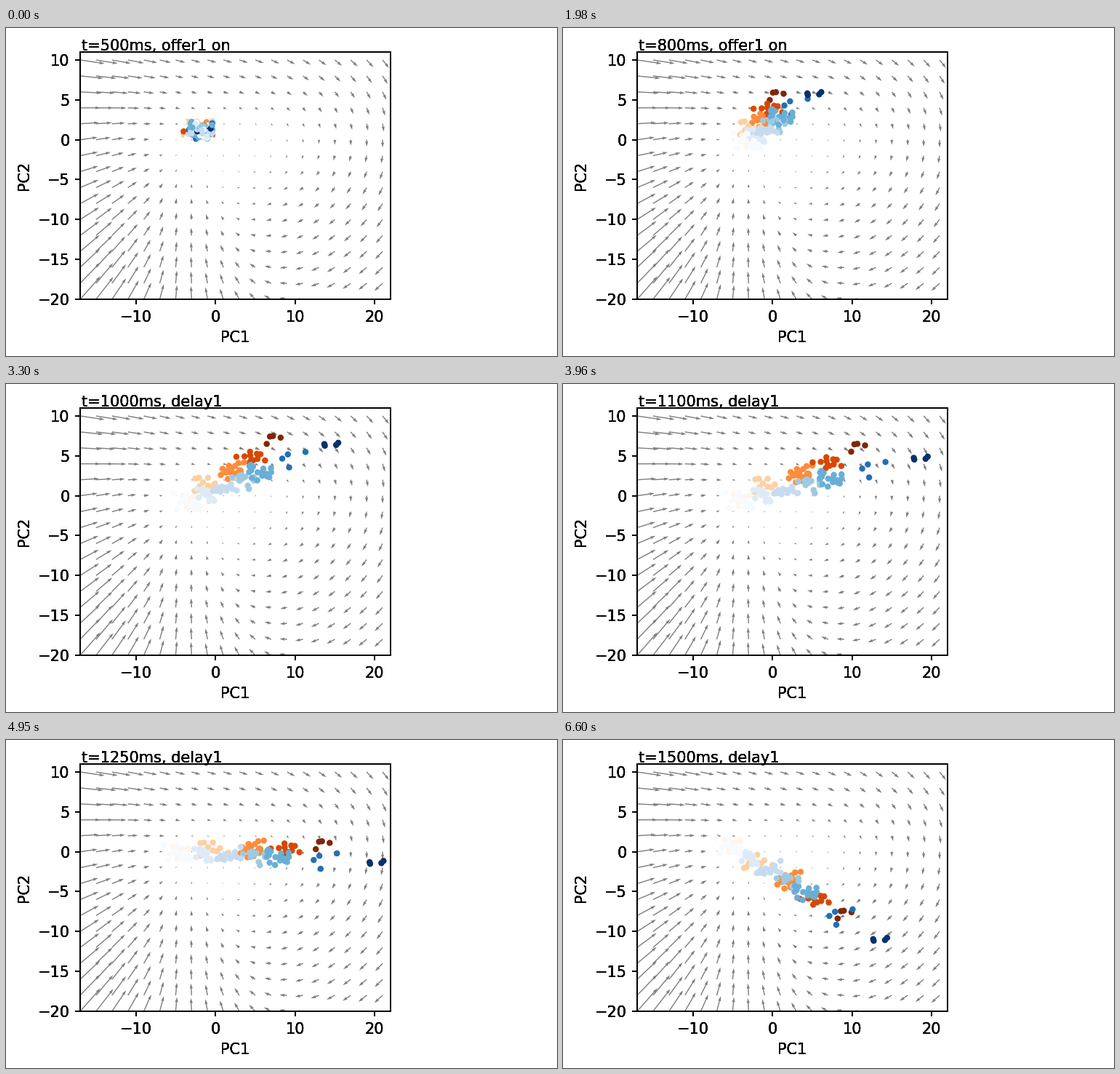
Animation, 758 px wide and 451 px high, one loop 8 s. Source, as a matplotlib script:

```python
import numpy as np
import matplotlib.pyplot as plt
from matplotlib.animation import FuncAnimation

DPI = 150
LOOP, INTERVAL, STEP_MS = 8000, 40, 330
LAST_STEP, KEY_GAP = 20, 4
rng = np.random.default_rng(4)


def sigmoid(z):
    return 1 / (1 + np.exp(-z))


def softplus(z, width):
    return width * np.log1p(np.exp(z / width))


def flow(x, y):
    """Velocity field of the two principal components."""
    up, down = np.maximum(y, 0), np.maximum(-y, 0)
    left = sigmoid((-x - 11) / 2)
    u = 2.1 * softplus(-x - 5.5, 1.5)
    u += up * (1.25 - 0.017 * np.abs(x))
    u -= 13 * np.tanh(down / 13) * sigmoid((x - 2) / 3)
    u += 0.2 * down * sigmoid((-x - 7) / 2)
    v = 3.5 * left - 0.63 * softplus(x - 4, 2)
    v -= up * (0.35 * sigmoid((12 - x) / 4) + 0.5 * left)
    lift = down ** 2 / (down + 1.5) * (1.1 + 0.45 * left)
    edge, width = 0.35 * down - 2, np.maximum(down, 1) / 5
    v += lift * sigmoid((edge - x) / width)
    return u, v


# Key points of the weakest trials and of the strongest of each colour map.
weak = np.array([(-2.2, 1.2), (-3.3, 0.4), (-2.9, -0.7),
                 (-4.1, -0.6), (-4.8, 0.0), (-5.3, 0.7)])
strong = {
    "Oranges": [(-2.2, 1.2), (-1.9, 3.8), (3.3, 6.7),
                (10.5, 6.0), (13.3, -1.1), (8.8, -7.9)],
    "Blues": [(-2.2, 1.2), (0.9, 4.1), (8.9, 6.8),
              (17.9, 4.7), (19.1, -3.5), (12.8, -11.0)],
}
levels = {
    "Oranges": np.repeat([0, 0.25, 0.5, 0.75, 1], [11, 11, 22, 11, 4]),
    "Blues": np.repeat([0, 0.125, 0.25, 0.375, 0.5, 0.75, 1],
                       [14, 11, 14, 12, 16, 4, 4]),
}


def trials(cmap):
    """Key positions and colours: level blends weak to strong, plus noise."""
    level = rng.permutation(levels[cmap])
    noise = np.clip(rng.normal(size=(len(level), 2)), -1.8, 1.8) * (1.0, 0.6)
    reach = np.array(strong[cmap]) - weak
    points = weak[:, None] + level[:, None] * reach[:, None] + noise
    return points, plt.get_cmap(cmap)(level)


(orange, orange_rgba), (blue, blue_rgba) = trials("Oranges"), trials("Blues")
paths = np.concatenate([orange, blue], axis=1)
colors = np.vstack([orange_rgba, blue_rgba])
slopes = np.gradient(paths, axis=0)
slopes[0] = 0


def positions(step):
    """Cubic Hermite interpolation between the key points."""
    i = min(step // KEY_GAP, len(paths) - 2)
    s = step / KEY_GAP - i
    rise = s * s * (3 - 2 * s)
    return ((1 - rise) * paths[i] + rise * paths[i + 1]
            + s * (1 - s) ** 2 * slopes[i]
            - s * s * (1 - s) * slopes[i + 1])


fig = plt.figure(figsize=(758.001 / DPI, 451.001 / DPI), dpi=DPI,
                 facecolor="white")


def add_layer(name):
    ax = fig.add_axes([102 / 758, 78 / 451, 427 / 758, 340 / 451],
                      facecolor="none", label=name)
    ax.set(xlim=(-17, 22), ylim=(-20, 11), xlabel="PC1", ylabel="PC2",
           xticks=range(-10, 21, 10), yticks=range(-20, 11, 5))
    return ax, ax.text(-16.8, 11.2, "", va="baseline")


# Stacked layers give the heavy lettering.
layers = [add_layer(f"layer{n}") for n in range(4)]
ax = layers[0][0]
titles = [title for _, title in layers]

gx, gy = np.meshgrid(np.arange(-17.0, 22, 2), np.arange(-20.0, 11, 2))
ax.quiver(gx, gy, *flow(gx, gy), color="gray", angles="xy",
          scale_units="xy", scale=11)
dots = ax.scatter(*paths[0].T, s=16.5, c=colors, linewidths=0, zorder=2)


def update(frame):
    # Round up to the end of the tick so that no change comes late.
    step = min((frame * INTERVAL + INTERVAL - 1) // STEP_MS, LAST_STEP)
    t = 500 + 50 * step
    phase = "offer1 on" if t < 1000 else "delay1"
    for title in titles:
        title.set_text(f"t={t}ms, {phase}")
    dots.set_offsets(positions(step))
    return dots, *titles


anim = FuncAnimation(fig, update, frames=LOOP // INTERVAL, interval=INTERVAL,
                     repeat=True, repeat_delay=0, blit=False)
plt.show()
```
